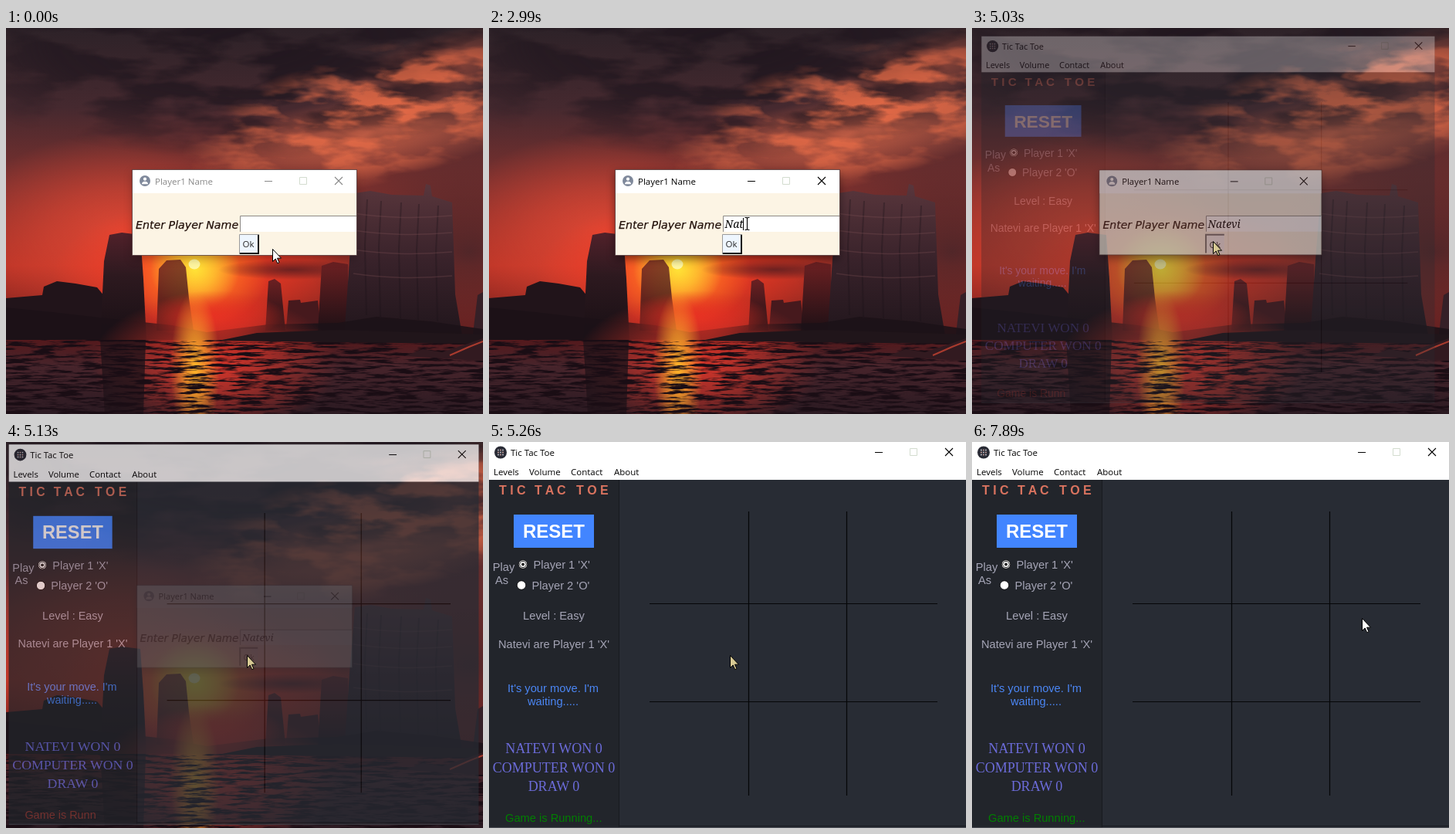
These frames come from a looping animation (618 by 500 pixels, 8000 ms). An HTML page:

```html
<!DOCTYPE html>
<html lang="en">
<head>
<meta charset="utf-8">
<title>Tic Tac Toe</title>
<style>
  html, body { margin: 0; width: 100%; height: 100%; overflow: hidden; background: #2a1a20; }
  svg { position: absolute; left: 0; top: 0; width: 618px; height: 500px; display: block; }
  #wallpaper { will-change: transform; }
  text { white-space: pre; }
  .ui { font: 11.5px "Open Sans", "Noto Sans", sans-serif; }
  .hand { font: italic 14.2px "DejaVu Sans", sans-serif; }
  .script { font: italic 14px "Noto Serif", serif; }
  .label { font: 14.667px "Liberation Sans", Arial, sans-serif; fill: #a5a5b6; }
  .heading { font: bold 16px "Liberation Sans", Arial, sans-serif; fill: #d9735f; }
  .reset { font: bold 24px "Liberation Sans", Arial, sans-serif; fill: #fff; }
  .score { font: 18px "Liberation Serif", Times, serif; fill: #6b6bd8; }
  .mid { text-anchor: middle; }
</style>
</head>
<body>
<svg id="wallpaper" viewBox="0 0 618 500"></svg>
<svg id="stage" viewBox="0 0 618 500"></svg>
<script>
const LOOP = 8000;
const NAME = "Natevi";
const $ = id => document.getElementById(id);

// ---------- markup helpers ----------
const rect = (x, y, w, h, fill, extra = "") =>
  `<rect x="${x}" y="${y}" width="${w}" height="${h}" fill="${fill}" ${extra}/>`;
const text = (x, y, cls, str, extra = "") =>
  `<text x="${x}" y="${y}" class="${cls}" ${extra}>${str}</text>`;
const line = (d, stroke, width = 1) =>
  `<path d="${d}" fill="none" stroke="${stroke}" stroke-width="${width}"/>`;
const shape = (points, fill, extra = "") => `<polygon points="${points}" fill="${fill}" ${extra}/>`;
const stops = list => list.map(([at, color, alpha = 1]) =>
  `<stop offset="${at}" stop-color="${color}" stop-opacity="${alpha}"/>`).join("");
const vertical = (id, list) =>
  `<linearGradient id="${id}" x2="0" y2="1">${stops(list)}</linearGradient>`;
const glow = (id, color, cx, cy, rx, ry, alpha = 1, turn = 0) =>
  `<radialGradient id="${id}">${stops([[0, color, alpha], [.45, color, alpha * .6], [1, color, 0]])}</radialGradient>
   <ellipse cx="${cx}" cy="${cy}" rx="${rx}" ry="${ry}" fill="url(#${id})" transform="rotate(${turn} ${cx} ${cy})"/>`;
const grain = (id, freq, seed, rgb, gain, bias) =>
  `<filter id="${id}" x="0" y="0" width="1" height="1" color-interpolation-filters="sRGB">
    <feTurbulence type="fractalNoise" baseFrequency="${freq}" numOctaves="4" seed="${seed}"/>
    <feColorMatrix values="${rgb.map(c => `0 0 0 0 ${c}`).join(" ")} ${gain} 0 0 0 ${bias}"/>
  </filter>`;
const windowButtons = (x, y) => `<g class="buttons">
  ${line(`M${x - 5} ${y + .5}h10`, "currentColor")}
  ${line(`M${x + 40.5} ${y - 4.5}h9v9h-9z`, "#d3dccf")}
  ${line(`M${x + 86} ${y - 5}l10 10m0 -10l-10 10`, "currentColor", 1.1)}</g>`;

// ---------- wallpaper: a red sunset over water ----------
$("wallpaper").innerHTML = `
<defs>
  ${vertical("sky", [[0, "#2d2228"], [.25, "#45292f"], [.5, "#80312e"], [.75, "#b83326"], [1, "#6a1c1c"]])}
  ${vertical("water", [[0, "#54191c"], [.35, "#47242b"], [1, "#2b1a22"]])}
  ${vertical("mesa", [[0, "#59363c"], [.5, "#38222a"], [1, "#1f151b"]])}
  ${vertical("rock", [[0, "#6c2022"], [1, "#1e1015"]])}
  ${vertical("tower", [[0, "#51212a"], [.4, "#2d191f"], [1, "#170f14"]])}
  ${grain("embers", ".012 .035", 8, [.9, .42, .28], 5, -2.2)}
  ${grain("smoke", ".009 .03", 3, [.13, .09, .12], 5, -2.1)}
  ${grain("ripples", ".03 .28", 5, [.1, .05, .08], 5, -2.2)}
  <radialGradient id="fade">${stops([[0, "#fff"], [.6, "#fff", .7], [1, "#fff", 0]])}</radialGradient>
  <mask id="cloudArea"><ellipse cx="490" cy="110" rx="270" ry="90" fill="url(#fade)" transform="rotate(-14 490 110)"/></mask>
  <mask id="smokeArea"><ellipse cx="310" cy="20" rx="420" ry="150" fill="url(#fade)"/></mask>
</defs>
${rect(0, 0, 618, 410, "url(#sky)")}
${glow("left", "#e84a35", 150, 265, 210, 130, .85)}
${glow("right", "#3a2329", 600, 290, 210, 150, .8)}
${glow("bank", "#d9694a", 470, 140, 230, 55, .8, -9)}
${glow("bank2", "#a54d3c", 570, 50, 150, 45, .75, -15)}
<g mask="url(#smokeArea)">${rect(0, 0, 618, 180, "#000", 'filter="url(#smoke)"')}</g>
<g mask="url(#cloudArea)">${rect(180, 0, 438, 230, "#000", 'filter="url(#embers)"')}</g>
${glow("halo", "#ff3a22", 250, 320, 190, 95, 1)}
${glow("warm", "#ff8a20", 245, 315, 95, 75, 1)}
${glow("yellow", "#ffe336", 245, 312, 58, 55, 1)}
${glow("streak", "#521c1f", 370, 313, 95, 13, .8)}
<ellipse cx="244" cy="306" rx="7.5" ry="6.5" fill="#fff6a0"/>
${shape("0,350 47,346 49,335 66,328 90,331 118,336 128,348 128,406 0,406", "#21141a")}
${shape("195,392 198,312 208,301 226,300 233,310 237,350 243,392", "url(#rock)", 'opacity=".8"')}
${shape("122,405 127,302 134,268 150,265 174,268 178,325 182,405", "url(#tower)")}
${shape("336,392 340,328 348,325 356,331 362,392", "url(#rock)")}
${shape("363,390 366,353 381,352 382,356 404,353 408,390", "#46191d")}
${shape("404,392 409,308 424,303 443,306 444,392", "url(#rock)")}
${shape("438,403 445,300 452,214 472,211 500,216 541,217 544,202 550,204 552,218 578,226 582,345 592,404", "url(#mesa)")}
${[468, 486, 512, 535, 560].map((x, i) => line(`M${x} ${222 + i * 2}l-3 60l2 90`, "#1d131a55", 2)).join("")}
${[240, 262, 287, 318].map(y => line(`M450 ${y}q60 9 128 3`, "#8055564d", 1.5)).join("")}
${shape("604,404 611,346 618,342 618,404", "#352027")}
${shape("0,362 60,368 130,376 215,385 260,394 340,384 430,382 480,374 550,380 618,390 618,408 0,408", "#1c1217", 'opacity=".88"')}
${glow("haze", "#e32a1f", 270, 372, 90, 32, .8)}
${rect(0, 404, 618, 96, "url(#water)")}
${glow("red", "#ff3a2a", 270, 435, 160, 90, .8)}
${shape("122,404 181,404 178,500 128,500", "#21131a", 'opacity=".8"')}
${glow("gold", "#ffb52a", 245, 440, 32, 100, 1)}
${rect(0, 404, 618, 96, "#000", 'filter="url(#ripples)"')}
${shape("275,405 325,395 430,391 618,397 618,409 420,407", "#20151a")}
${shape("516,425 540,416 565,420 598,409 618,402 618,431 595,430 570,428", "#321a20")}
${line("M575 424l25 -11l18 -7", "#a93b2e", 2)}`;

// ---------- windows and pointer ----------
const dialog = `
<g id="dialog">
  <g filter="url(#soft)"><rect id="shadow" x="164" y="188" width="290" height="111"/></g>
  ${rect(163.5, 183.5, 291, 111, "#fcf4e4", 'stroke="#4a3034" stroke-opacity=".75"')}
  ${rect(164, 184, 290, 30, "#fff")}
  <circle cx="180" cy="198" r="7" fill="#7f899b"/>
  <circle cx="180" cy="195.7" r="2.1" fill="#fff"/>
  <path d="M176 202.3q0-3.6 4-3.6t4 3.6z" fill="#fff"/>
  <g id="caption">${text(193, 203, "ui", "Player1 Name", 'fill="currentColor"')}${windowButtons(340, 198)}</g>
  ${text(168, 260, "hand", "Enter Player Name", 'fill="#23120c" stroke="#23120c" stroke-width=".25"')}
  ${rect(303, 243, 151, 21, "#fff")}
  ${line("M303.5 264v-20.5h150.5", "#8d8a85")}
  <text id="entry" x="305.5" y="259" class="script"></text>
  ${rect(305, 246, 1, 16, "#000", 'id="caret"')}
  <g id="raised">
    ${rect(302, 267, 26, 26, "#eef6fe")}
    ${line("M302.5 293v-25.5h25.5", "#9a9a9a")}
    ${line("M303 292h24v-24", "#111", 2)}
  </g>
  <g id="sunken">
    ${rect(302, 267, 25, 25, "#f1f1f0")}
    ${line("M303 292v-24h24", "#6d6d6d", 2)}
  </g>
  ${text(306.5, 284, "ui", "Ok", 'id="ok" fill="#282828"')}
</g>`;

const radio = (x, y, on) => `<circle cx="${x}" cy="${y}" r="5.8" fill="#fff" stroke="#0c0c0e"/>` +
  (on ? `<circle cx="${x}" cy="${y}" r="4.2" fill="none" stroke="#222" stroke-width="1"/><circle cx="${x}" cy="${y}" r="2" fill="#222"/>` : "");

const game = `
<g id="game">
  ${rect(0, 0, 618, 500, "#282c34")}
  ${rect(0, 49, 168, 451, "#22252b")}
  ${line("M168.5 49v451M169 497.5h449", "#181a1f")}
  ${rect(0, 499, 618, 1, "#4b4d54")}
  ${rect(0, 0, 618, 49, "#fff")}
  <circle cx="15" cy="13.5" r="8" fill="#292b35"/>
  ${[-3, 0, 3].map(dx => [-3, 0, 3].map(dy =>
    `<circle cx="${15 + dx}" cy="${13.5 + dy}" r=".9" fill="${(dx + dy) % 2 ? "#d5a9a5" : "#c9ccd4"}"/>`).join("")).join("")}
  ${text(28, 18, "ui", "Tic Tac Toe")}
  ${windowButtons(505, 13)}
  ${[[6, "Levels"], [52, "Volume"], [106, "Contact"], [162, "About"]].map(([x, s]) => text(x, 43, "ui", s)).join("")}
  ${[[13, "T I C"], [59, "T A C"], [113, "T O E"]].map(([x, s]) => text(x, 68, "heading", s)).join("")}
  ${rect(32, 94, 104, 43, "#4285ff")}
  ${text(84, 124, "reset mid", "RESET")}
  ${text(19, 167, "label mid", "Play")}${text(16.5, 184, "label mid", "As")}
  ${radio(44, 158.5, true)}${text(57.5, 164, "label", "Player 1 'X'")}
  ${radio(42, 185.5, false)}${text(55.5, 191, "label", "Player 2 'O'")}
  ${text(84, 230, "label mid", "Level : Easy")}
  ${text(84, 267, "label mid", NAME + " are Player 1 'X'")}
  ${text(83, 324, "label mid", "It's your move. I'm", 'style="fill:#4b86f4"')}
  ${text(83, 341, "label mid", "waiting.....", 'style="fill:#4b86f4"')}
  ${[NAME.toUpperCase() + " WON 0", "COMPUTER WON 0", "DRAW 0"].map((s, i) =>
    text(84, 403 + i * 24.5, "score mid", s)).join("")}
  <text id="status" x="21" y="492" class="label"></text>
  ${line("M336.5 90v368M463.5 90v368M208 209.5h373M208 336.5h373", "#050608", 1.2)}
</g>`;

$("stage").innerHTML = `
<defs><filter id="soft" x="-20%" y="-40%" width="140%" height="180%"><feGaussianBlur stdDeviation="6"/></filter></defs>
${dialog}${game}
<circle id="click" r="12" fill="#f5ee20" fill-opacity=".82"/>
<g id="ibeam">${line("M-3 -7.5h2l1 1l1 -1h2M0 -7v15M-3 8.5h2l1 -1l1 1h2", "#000", 1.1)}</g>
<path id="arrow" d="M.5 .5v16l3.7-3.5l2.5 5.7l2.3-1l-2.5-5.5h5z" stroke="#000"/>`;

// ---------- timing ----------
const between = (t, a, b) => t >= a && t < b;
const keyTimes = [2220, 2520, 2990, 3160, 3310, 3540];
const caretOn = [[590, 1210], [1530, 2140], [2370, 3160], [3390, 3860], [4240, 4727]];

// Each glide: start, end, number of steps, way points.
const glides = [
  [0, 0, 1, [[345, 286]]],
  [70, 270, 4, [[345, 286], [334, 253]]],
  [4410, 4480, 2, [[334, 253], [332, 300]]],
  [4650, 4880, 4, [[332, 300], [312, 276], [312, 276]]],
  [5720, 5720, 1, [[312, 280]]],
  [5950, 6260, 5, [[312, 280], [312, 288], [269, 236]]],
  [6410, 6410, 1, [[232, 228]]],
  [6488, 7190, 10, [[232, 228], [170, 150], [145, 80], [175, 60], [246, 111]]],
  [7260, 7490, 4, [[246, 111], [258, 130]]],
  [7740, 7890, 3, [[258, 130], [505, 228]]],
];

// Each stage: time, game opacity and scale, dialog opacity and scale.
const opening = [
  [0, 0, 1, 1, 1],
  [5030, .3, .95, .8, .99],
  [5130, .74, .985, .42, .96],
  [5180, .93, .996, .15, .94],
  [5260, 1, 1, 0, 1],
];

const latest = (list, t) => list.filter(item => item[0] <= t).pop();

function pointerAt(t) {
  const [start, end, steps, points] = latest(glides, t);
  if (points.length === 1) return points[0];
  const step = Math.min(steps - 1, Math.floor((t - start) / (end - start) * (steps - 1) + 1e-6));
  const along = (step + 1) / steps * (points.length - 1);
  const i = Math.min(points.length - 2, Math.floor(along));
  const mix = k => Math.round(points[i][k] + (points[i + 1][k] - points[i][k]) * (along - i));
  return [mix(0), mix(1)];
}

const show = (id, visible) => $(id).style.display = visible ? "" : "none";
const scaleAbout = (cx, cy, s) => `translate(${cx * (1 - s)} ${cy * (1 - s)}) scale(${s})`;
const set = (id, attrs) => { for (const key in attrs) $(id).setAttribute(key, attrs[key]); };

function render(t) {
  const focused = t >= 590;
  set("caption", { color: focused ? "#000" : "#888" });
  set("shadow", { "fill-opacity": focused ? .5 : .25 });

  const typed = NAME.slice(0, keyTimes.filter(k => k <= t).length);
  if ($("entry").textContent !== typed) $("entry").textContent = typed;
  const width = typed ? $("entry").getComputedTextLength() : 0;
  set("caret", { x: Math.round(305 + width) });
  show("caret", caretOn.some(([a, b]) => between(t, a, b)));

  const pressed = t >= 4880;
  show("raised", !pressed);
  show("sunken", pressed);
  set("ok", { transform: pressed ? "translate(1 1)" : "" });

  const [, gameAlpha, gameScale, dialogAlpha, dialogScale] = latest(opening, t);
  set("game", { opacity: gameAlpha, transform: scaleAbout(247, 215, gameScale) });
  set("dialog", { opacity: dialogAlpha, transform: scaleAbout(308, 238, dialogScale) });
  show("game", gameAlpha > 0);
  show("dialog", dialogAlpha > 0);
  const ready = t >= 5180;
  $("status").textContent = ready ? "Game is Running..." : "Game is Runn";
  $("status").style.fill = ready ? "#008000" : "#8c3a34";

  const [x, y] = pointerAt(t);
  const editing = between(t, 203, 4410);
  show("ibeam", editing);
  show("arrow", !editing);
  set("ibeam", { transform: `translate(${x + .5} ${y})` });
  set("arrow", { transform: `translate(${x} ${y})`, fill: between(t, 5030, 5720) ? "#d8ca94" : "#fff" });

  const firstClick = between(t, 590, 740);
  show("click", firstClick || between(t, 4803, 5030));
  set("click", firstClick ? { cx: 332, cy: 252 } : { cx: 314, cy: 278 });
}

const began = performance.now();
function tick() {
  render((performance.now() - began) % LOOP);
  requestAnimationFrame(tick);
}
tick();
</script>
</body>
</html>
```
